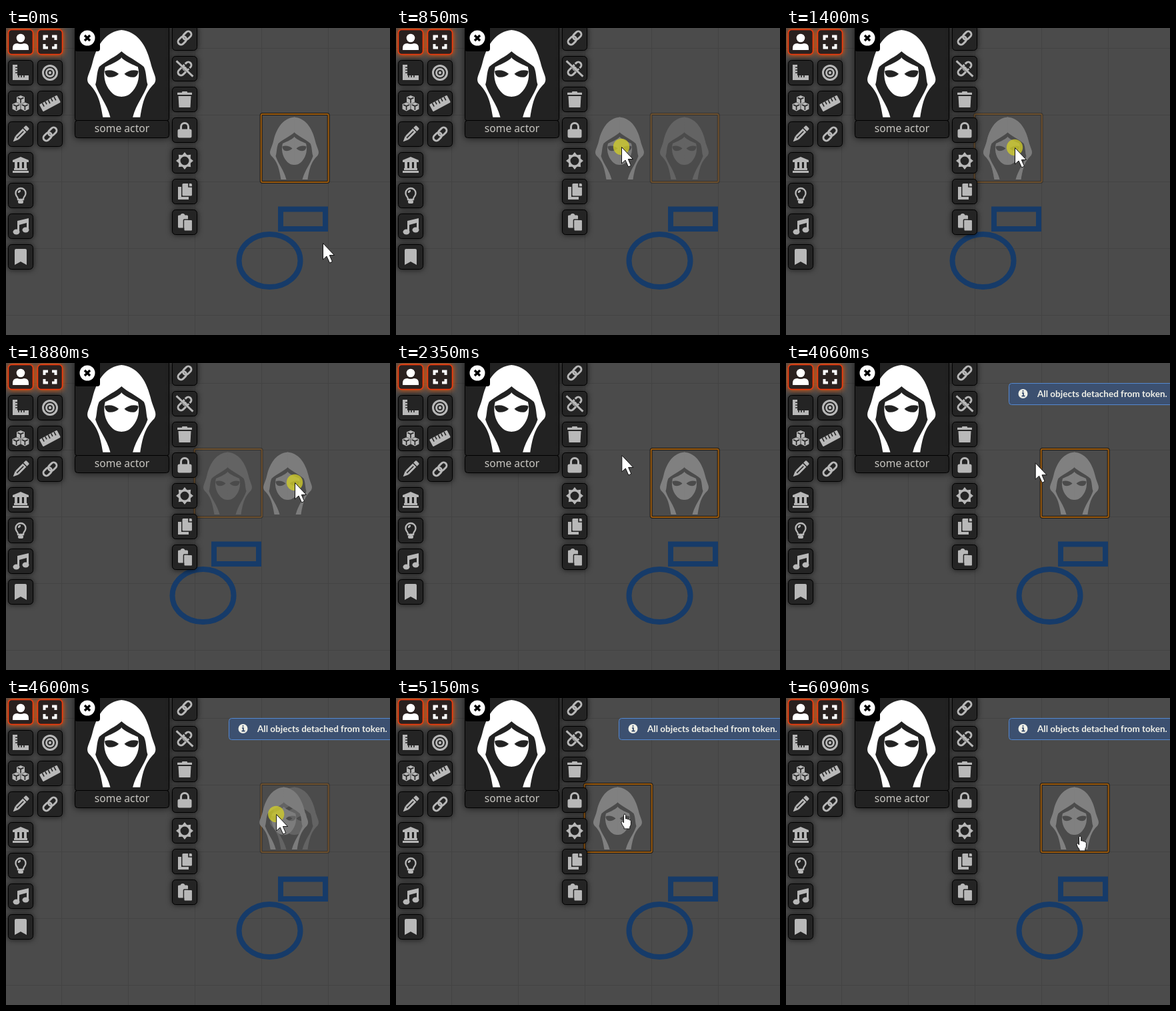
An HTML page for the animation above (6.16 s loop, 576 by 460 pixels).

```html
<!DOCTYPE html>
<html lang="en">
<head>
<meta charset="utf-8">
<title>Token drag</title>
<style>
  html, body { margin: 0; width: 100%; height: 100%; overflow: hidden; background: #4b4b4b; }
  svg { display: block; }
  .button { color: #b8b8b8; }
  .button > rect { fill: #242424; stroke: #000; filter: drop-shadow(0 0 4px #000b); }
  .button.active { color: #fff; }
  .button.active > rect { fill: #2a211f; stroke: #f5380c; stroke-width: 1.5; filter: drop-shadow(0 0 4px #ff5a00); }
  .icon { fill: currentColor; }
  .line { fill: none; stroke: currentColor; stroke-width: 3; }
  .cut { fill: none; stroke: #242424; stroke-width: 1.6; }
  .panel { fill: #222; stroke: #000; }
  .shade { filter: drop-shadow(0 0 6px #000b); }
  .drawing { fill: none; stroke: #163b69; stroke-width: 8; }
  .frame { fill: none; stroke: #1f1a14; stroke-width: 4; }
  .frame .inner { stroke: #9a5b10; stroke-width: 2; }
</style>
</head>
<body>
<svg width="576" height="460" viewBox="0 0 576 460">
  <defs>
    <path id="half" fill-rule="evenodd" d="
      M.4 3.5C-16 5-26 18-31 38C-34 51-39 55-35 61C-26 70-23 78-20 97H-12
      C-16 82-24 74-28 62C-26 56-27 50-24 43C-16 36-6 32 .4 26Z
      M.4 33C-5 38-13 41-17.5 43C-20 52-18 62-12 69C-8 74-4 75 .4 75Z
      M-18 47.5C-13 45.5-7 47-3 50.5C-6 54-12 55-15 53.5C-17 52-18 50-18 47.5Z"/>
    <g id="emblem" transform="translate(49.5)">
      <use href="#half"/>
      <use href="#half" transform="scale(-1 1)"/>
    </g>
  </defs>

  <rect width="576" height="460" fill="#4b4b4b"/>
  <path id="grid" stroke="#434343"/>

  <g id="drawings" class="drawing">
    <rect x="412" y="271.5" width="67" height="29.5"/>
    <ellipse cx="395.5" cy="348.5" rx="46" ry="39.5"/>
  </g>

  <g id="token">
    <g class="frame">
      <rect x="382.7" y="129" width="101" height="102" rx="2"/>
      <rect class="inner" x="382.7" y="129" width="101" height="102" rx="2"/>
    </g>
    <use href="#emblem" x="383" y="130" fill="#808080"/>
  </g>
  <use id="preview" href="#emblem" x="383" y="130" fill="#7c7c7c"/>

  <g class="shade">
    <rect class="panel" x="103.5" y="-5.5" width="141" height="144" rx="3"/>
    <rect class="panel" x="103.5" y="138.5" width="141" height="26" rx="4"/>
  </g>
  <use href="#emblem" transform="translate(104 -2) scale(1.4)" fill="#fff"/>
  <rect x="103" y="-4" width="38" height="39" rx="4"/>
  <circle cx="122" cy="15" r="11.5" fill="#fff"/>
  <path d="M118 11l8 8m0-8l-8 8" stroke="#000" stroke-width="3.4"/>
  <text x="174" y="156" text-anchor="middle" font-family="'Noto Sans', sans-serif" font-weight="500" font-size="15.7" fill="#c8c6c1">some actor</text>

  <g id="buttons"></g>

  <g id="notice">
    <rect x="334.5" y="30.5" width="260" height="32" rx="4" fill="#3c5070" stroke="#5488cf"/>
    <circle cx="355.5" cy="46" r="7" fill="#f0f0e8"/>
    <path d="M354 45h2v4.5m-2.5 0h5M355.5 41v2" fill="none" stroke="#3c5070" stroke-width="1.8"/>
    <text x="377" y="51" font-family="Lato, sans-serif" font-weight="700" font-size="13.5" fill="#f0f0e8">All objects detached from token.</text>
  </g>

  <g id="cursor" fill="#fff" stroke="#111" stroke-linejoin="round">
    <circle id="press" r="12.2" fill="#d2ce28" fill-opacity=".76" stroke="none"/>
    <path id="arrow" d="M.5 .5V25L6 20L10.5 30L14.5 28.2L10.3 18.5H17.5Z"/>
    <path id="hand" d="M-1.5 12V1.5Q-1.5 0 0 0T1.7 1.5V7Q3.5 6 4.5 7.7Q6.3 6.9 7 8.6Q9.4 8 9.4 10.5V15Q9.4 17 7.8 19V22H-1V19.8Q-4 16.5-5 12.8Q-5.2 10.7-3.6 10.8Q-2.3 11-1.5 13Z"/>
  </g>
</svg>

<script>
const LOOP = 6160, CELL = 100;
const $ = id => document.getElementById(id);

// Small drawing helpers; every icon is built around its own centre.
const shape = (d, kind = "") => `<path class="${kind}" d="${d}"/>`;
const disc = (x, y, rx, ry = rx) => `<ellipse cx="${x}" cy="${y}" rx="${rx}" ry="${ry}"/>`;
const ring = (r, kind = "line") => `<circle class="${kind}" r="${r}"/>`;
const box = (w, h, r = 0, x = 0, y = 0, kind = "") =>
  `<rect class="${kind}" x="${x - w / 2}" y="${y - h / 2}" width="${w}" height="${h}" rx="${r}"/>`;
const turn = (angle, art) => `<g transform="rotate(${angle})">${art}</g>`;
const shift = (x, y, art) => `<g transform="translate(${x} ${y})">${art}</g>`;
const repeat = (n, make) => Array.from({ length: n }, (_, i) => make(i)).join("");

const cube = shape("M0-6.5L6-4V3.5L0 6.5L-6 3.5V-4Z") + shape("M-4.5-3L0-1L4.5-3M0-1V5", "cut");
const chain = turn(-45, box(14, 9, 4.5, -5.2, 0, "line") + box(14, 9, 4.5, 5.2, 0, "line"));
const page = box(14.5, 18.5, 1.5, 3.7, -2.7) + shape("M6-12V-7H11", "cut");

const icons = {
  user: disc(0, -6, 6.3) + shape("M-12 12V9Q-12 2-5 2Q0 4 5 2Q12 2 12 9V12Z"),
  expand: repeat(4, i => turn(i * 90, shape("M-10.5-3V-10.5H-3V-6.5H-6.5V-3Z"))),
  square: shape("M-12-12H-5V4H12V11H-12Z") + repeat(3, i => shape(`M-8 ${i * 4 - 8}h4M${i * 4 - 3} 7v-4`, "cut")),
  target: ring(10.5) + ring(5.5) + disc(0, 0, 2.2),
  cubes: shift(0, -5.5, cube) + shift(-6.4, 5, cube) + shift(6.4, 5, cube),
  ruler: turn(-28, box(30, 12, 1.5) + repeat(5, i => shape(`M${i * 5 - 10}-6v${6 - i % 2}`, "cut"))),
  pencil: turn(45, box(7.4, 23, 1.5, 0, -3.5) + shape("M-3.7 8H3.7L0 16Z") + shape("M-4-9H4M0-6V8", "cut")),
  link: chain,
  museum: shape("M0-12L12-7V-4H-12V-7Z") + repeat(3, i => box(4, 10, 0, i * 7 - 7, 1)) + box(20, 3, 0, 0, 6.5) + box(24, 3, 0, 0, 10.5),
  bulb: shape("M-4 6Q-4 3-6 1A7.5 7.5 0 1 1 6 1Q4 3 4 6ZM-3-4Q-3-7 0-7", "line\" stroke-width=\"2\" style=\"stroke-width:2.3") + box(8, 5, 2, 0, 9.5),
  music: shape("M-5-8L12-12V6H9V-5L-2-2V9H-5Z") + disc(-6.5, 8.5, 5, 4) + disc(7.5, 5.5, 5, 4),
  bookmark: shape("M-9-10Q-9-12-7-12H7Q9-12 9-10V12L0 7L-9 12Z"),
  unlink: chain + turn(43, box(36, 6, 0, 0, -2, "cut") + box(34, 3)),
  trash: box(22, 3.2, .5, 0, -8.7) + box(8, 3, 1, 0, -10.5) + shape("M-9.5-5H9.5L8.5 12H-8.5Z"),
  lock: box(21, 13, 2.5, 0, 5) + shape("M-5.5 0V-5A5.5 5.5 0 0 1 5.5-5V0", "line"),
  sun: repeat(8, i => turn(i * 45, shape("M-4-8L0-13L4-8Z"))) + ring(6.5, "cut") + shape("M-8 0A8 8 0 0 1 8 0A8 8 0 0 1-8 0", "line"),
  copy: shape("M-10-7H-5V8H6V12H-10Z") + page,
  paste: box(15, 19, 1.5, -2.5, -1) + disc(-3, -9.5, 3.5) + box(13, 17, 1, 5, 4.5, "cut") + box(11.5, 15.5, 1, 5.2, 4.7)
};

const columns = [
  [22, 21, "user square cubes pencil museum bulb music bookmark"],
  [66, 21, "expand target ruler link"],
  [268, 15, "link unlink trash lock sun copy paste"]
];
const isActive = name => name === "user" || name === "expand";
$("buttons").innerHTML = columns.map(([x, top, names]) => names.split(" ").map((name, i) =>
  `<g class="button ${isActive(name) ? "active" : ""}" transform="translate(${x} ${top + i * 46})">
    ${box(37, 37, 5)}<g class="icon">${icons[name]}</g></g>`).join("")).join("");

$("grid").setAttribute("d", Array.from({ length: 5 },
  (_, i) => `M${83.5 + i * CELL} 0V460M0 ${30.5 + i * CELL}H576`).join(""));

// Pointer moves; a drag carries the token one cell, and linked drawings follow it.
const glide = (at, length, x, y) => ({ at, length, x, y });
const drag = (at, length, x, y, linked) => ({ at, length, x, y, linked, cells: 1 });
const start = { x: 475, y: 322 };
const moves = [
  glide(0, 150, 435, 178),
  drag(380, 470, 338, 178, true),
  glide(1010, 200, 343, 179),
  drag(1400, 480, 433, 179, true),
  glide(2040, 510, 290, 117),
  glide(2600, 220, 262, 62),
  glide(3050, 230, 243, 81),
  glide(3750, 470, 421, 174),
  drag(4520, 280, 343, 174, false),
  drag(5300, 280, 425, 172, false),
  glide(5860, 230, 441, 207)
];

const clamp = v => Math.min(1, Math.max(0, v));
const smooth = k => k * k * (3 - 2 * k);
const mix = (a, b, k) => a + (b - a) * k;
const place = (id, x, y = 0) => $(id).setAttribute("transform", `translate(${x} ${y})`);
const show = (id, visible) => $(id).setAttribute("visibility", visible ? "visible" : "hidden");

function sceneAt(t) {
  const scene = { ...start, tokenX: 0, drawingsX: 0, carried: null };
  for (const move of moves) {
    if (t < move.at) break;
    const { x, y, tokenX } = scene;
    const k = smooth(clamp((t - move.at) / move.length));
    scene.x = mix(x, move.x, k);
    scene.y = mix(y, move.y, k);
    scene.carried = null;
    if (!move.cells) continue;

    const target = tokenX ? 0 : -CELL;
    const drop = move.at + move.length + (move.linked ? 150 : 30);
    if (t < drop) {
      scene.carried = { x: tokenX + scene.x - x, y: scene.y - y };
    } else {
      scene.tokenX = mix(tokenX, target, clamp((t - drop) / 230));
      if (move.linked) scene.drawingsX = target;
    }
  }
  return scene;
}

function draw(now) {
  const t = now % LOOP;
  const { x, y, tokenX, drawingsX, carried } = sceneAt(t);
  const overToken = Math.abs(x - 433 - tokenX) < 51 && Math.abs(y - 180) < 51;
  const overButton = Math.abs(x - 268) < 19 && y < 310;
  const pointing = !carried && (overToken || overButton);

  place("token", tokenX);
  place("drawings", drawingsX);
  place("cursor", x, y);
  if (carried) place("preview", carried.x, carried.y);
  $("token").setAttribute("opacity", carried ? 0.45 : 1);
  $("notice").setAttribute("opacity", clamp((t - 2980) / 360));
  show("preview", carried);
  show("press", carried);
  show("hand", pointing);
  show("arrow", !pointing);
  requestAnimationFrame(() => draw(performance.now()));
}
draw(0);
</script>
</body>
</html>
```
